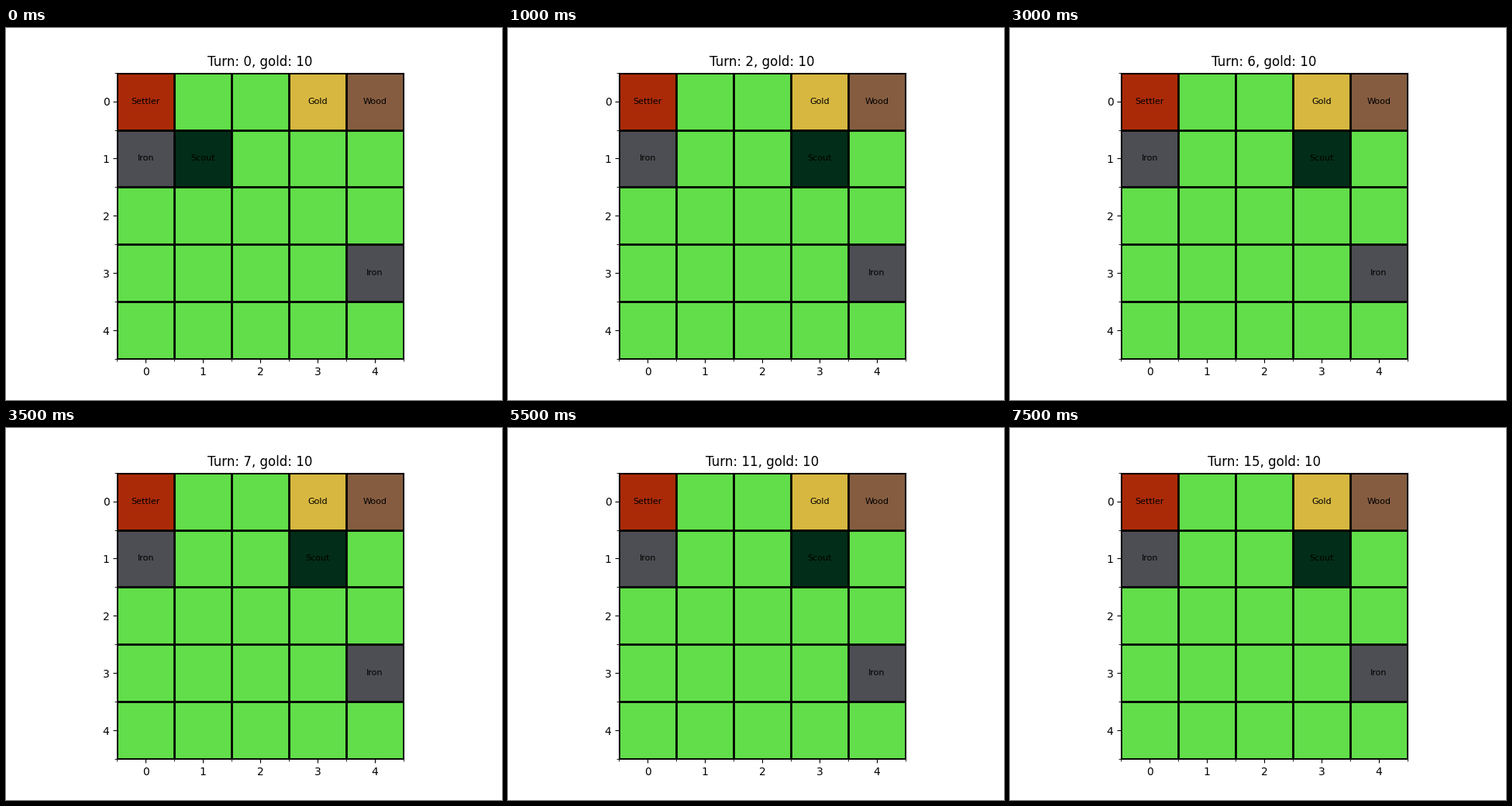
Recreate the animation shown at these times as a matplotlib script. Size 640 by 480 pixels, loop 8 s.

```python
import numpy as np
import matplotlib.pyplot as plt
from matplotlib.animation import FuncAnimation
from matplotlib.colors import to_rgb

SIZE = 5
TURNS = 16
GOLD = 10
GRASS = "#62de4a"
COLORS = {
    "Settler": "#aa2a08",
    "Scout": "#022d18",
    "Gold": "#d7b740",
    "Wood": "#855c40",
    "Iron": "#4d4e53",
}
# (row, column, name)
FIXED = [
    (0, 0, "Settler"),
    (0, 3, "Gold"),
    (0, 4, "Wood"),
    (1, 0, "Iron"),
    (3, 4, "Iron"),
]


def scout_column(turn):
    """The scout walks right for two turns, then stays."""
    return 1 + min(turn, 2)


def board(turn):
    cells = np.empty((SIZE, SIZE, 3))
    cells[:] = to_rgb(GRASS)
    for row, col, name in FIXED + [(1, scout_column(turn), "Scout")]:
        cells[row, col] = to_rgb(COLORS[name])
    return cells


def label(row, col, name):
    return ax.text(col, row, name, ha="center", va="center",
                   color="black", fontsize=8)


fig, ax = plt.subplots(figsize=(6.4, 4.8), dpi=100)
image = ax.imshow(board(0))
edges = np.arange(-0.5, SIZE, 1)
ax.set_xticks(range(SIZE))
ax.set_yticks(range(SIZE))
ax.set_xticks(edges, minor=True)
ax.set_yticks(edges, minor=True)
ax.grid(which="minor", color="black", linestyle="-", linewidth=2)

for cell in FIXED:
    label(*cell)
scout = label(1, scout_column(0), "Scout")
title = ax.set_title("")


def update(turn):
    image.set_data(board(turn))
    scout.set_x(scout_column(turn))
    title.set_text(f"Turn: {turn}, gold: {GOLD}")
    return image, scout, title


anim = FuncAnimation(fig, update, frames=TURNS, interval=500,
                     repeat=True, repeat_delay=0)
plt.show()
```
